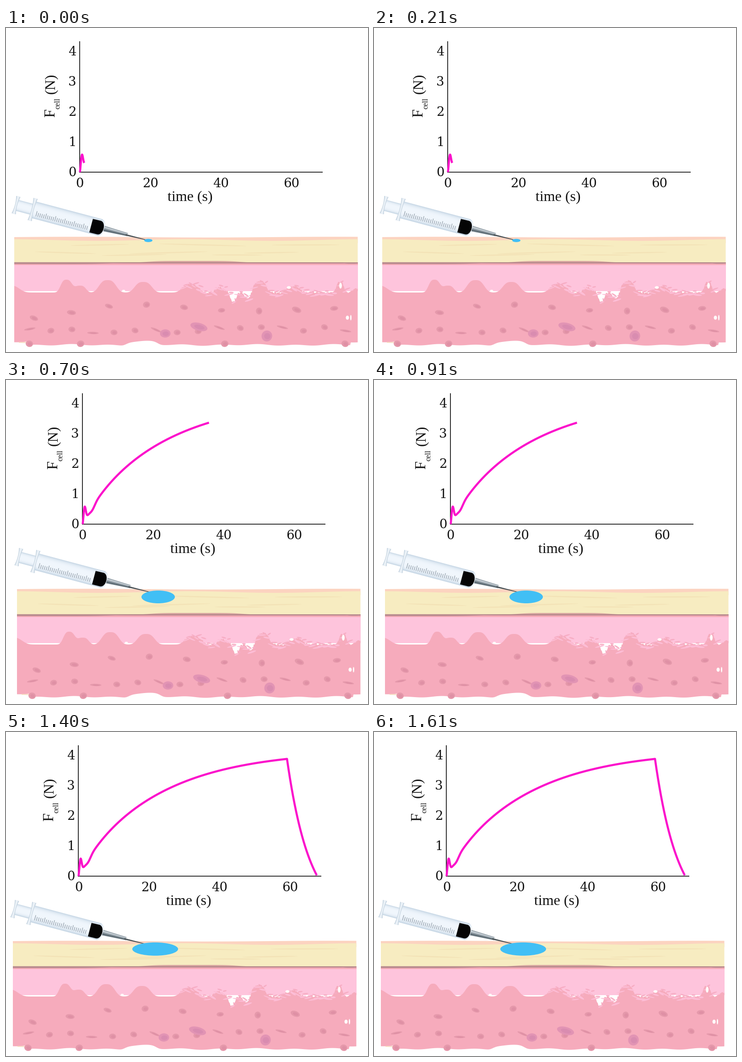
These frames come from a looping animation (791 by 708 pixels, 1750 ms). A matplotlib script:

```python
import math
import numpy as np
import matplotlib.pyplot as plt
from matplotlib.animation import FuncAnimation
from matplotlib.patches import Ellipse, Polygon

W, H, DPI = 791, 708, 100
PX = 72 / DPI  # points per pixel
LEFT, RIGHT = 18, 768.5  # sides of the skin block
X0, Y0 = 161, 315  # origin of the graph

plt.rcParams["toolbar"] = "None"
fig = plt.figure(figsize=(W / DPI, H / DPI), dpi=DPI, facecolor="white")
ax = fig.add_axes([0, 0, 1, 1])
ax.set_xlim(0, W)
ax.set_ylim(H, 0)
ax.axis("off")


def shape(pts, color, z):
    ax.add_patch(Polygon(pts, closed=True, fc=color, lw=0, zorder=z))


def oval(x, y, w, h, color, z, tilt=0):
    return ax.add_patch(Ellipse((x, y), w, h, angle=tilt, fc=color, lw=0, zorder=z))


def line(xs, ys, color, width, z):
    return ax.plot(xs, ys, color=color, lw=width * PX, zorder=z, snap=False,
                   solid_capstyle="butt", solid_joinstyle="round")[0]


def label(x, y, s, size, family="Liberation Serif", **kw):
    kw = {"ha": "center", "va": "baseline", **kw}
    ax.text(x, y, s, fontsize=size * PX, family=family, color="#111111", zorder=9, **kw)


def band(x, top, bottom, color, z):
    """Fill between two edges; each may be an array or a constant."""
    top, bottom = (np.broadcast_to(e, x.shape) for e in (top, bottom))
    shape(np.vstack([np.c_[x, top], np.c_[x, bottom][::-1]]), color, z)


def hump(x, centre, width, power=2):
    return np.exp(-np.abs((x - centre) / width) ** power)


# ---- graph ----
def draw_axes():
    line([X0, X0], [29, Y0 + .8], "black", 1.6, 8)
    line([X0, 692], [Y0, Y0], "black", 1.6, 8)
    for i in range(5):
        label(145, 323.5 - 65.9 * i, str(i), 27.5, "DejaVu Serif")
    for i in range(4):
        label(X0 + .5 + 153.9 * i, 348, str(20 * i), 27.5, "DejaVu Serif")
    label(402.5, 377.5, "time (s)", 32)
    up = {"rotation": 90, "ha": "left", "rotation_mode": "anchor"}
    label(106, 195, "F", 33, **up)
    label(117, 177, "cell", 17, **up)
    label(106, 143.5, "(N)", 32, **up)


def make_trace():
    x = np.arange(0, 455.6, .5)
    rise = (275 * (1 - np.exp(-x / 170)) + 8 * x / 60 * np.exp(1 - x / 60)
            + 30 * hump(x, 4.3, 3.5) * np.tanh(x / 1.5) - 7 * hump(x, 21, 8))
    s = np.linspace(0, 1, 80)
    fall = rise[-1] + (2 - rise[-1]) * (1 - np.exp(-1.3 * s)) / (1 - np.exp(-1.3))
    return X0 + .5 + np.r_[x, x[-1] + 65 * s], Y0 - np.r_[rise, fall]


# ---- skin ----
def draw_skin():
    rng = np.random.default_rng(12)
    x = np.linspace(LEFT, RIGHT, 500)

    # outer layers
    band(x, 457 + .8 * np.sin(x / 90 + 3), 470, "#fcd3c0", 1)
    band(x, 463.3 + 1.8 * np.cos((x - 200) / 61), 514, "#f7ecc1", 2)
    for i in range(8):
        oval(130 + 75 * i, (491, 474, 496)[i % 3], rng.uniform(110, 200), 2.5, "#f3e2b6", 3,
             rng.uniform(-2, 2))
    band(x, 513, 575, "#fec4dc", 3)
    band(x, 513, 517.5, "#f5abb7", 4)
    line([LEFT, RIGHT], [513, 513.2], "#a97d82", 2.4, 5)
    band(x, 512, 513.2 + 2.6 * hump(x, 90, 140, 6) + 2 * hump(x, 755, 16, 4), "#b98b8f", 5)
    band(x, 512.5 - 3.5 * hump(x, 410, 105, 6), 512.5, "#d6a6a0", 4)

    # ragged border of the deep layer
    ridge = 578 + 0 * x
    for cx, height, width in [(5, 16, 28), (132, 28, 15), (162, 15, 15), (222, 27, 22),
                              (300, 23, 22), (403, 18, 22), (468, 10, 14), (497, -20, 8),
                              (528, -12, 9), (555, 25, 16), (628, 13, 18), (730, 23, 10),
                              (768, 9, 14)]:
        ridge -= height * hump(x, cx, width, 3)
    ridge += rng.normal(0, 1.3, x.size) * (x > 380)
    base = (692.5 + 1.2 * np.sin(x / 13) + .8 * np.sin(x / 31)
            - 7.5 * hump(x, 297, 36, 6) - 7.5 * (x < 46) - 6 * (x > 752))
    band(x, ridge, base, "#f6abbc", 6)
    line([28, 48], [687, 687.5], "#f7dcc0", 2, 6)

    # torn flecks and small gaps
    for fx in np.arange(388, 745, 11):
        fy = np.interp(fx, x, ridge)
        oval(fx, fy + rng.uniform(2, 7), rng.uniform(10, 22), rng.uniform(2, 4.5), "#fdbdd6", 7,
             rng.uniform(-35, 35))
        oval(fx + 5, fy - rng.uniform(0, 4), rng.uniform(8, 16), 3, "#f7adc4", 7,
             rng.uniform(-35, 35))
    for gx, gy, w, h in [(731, 563, 6, 13), (618, 567, 9, 6), (257, 574, 7, 4),
                         (746, 633, 7, 9), (753.5, 633, 3, 12)]:
        oval(gx, gy, w, h, "#fffafa", 8)

    # cells in three rows
    def cell(cx, cy, w, h, outer="#e599ab", inner="#df90a5"):
        tilt = rng.uniform(-15, 25)
        oval(cx, cy, w, h, outer, 7, tilt)
        oval(cx + 1, cy + .5, w * .6, h * .55, inner, 7, tilt)

    for i in range(9):
        cell(61 + 82 * i, 614 + 20 * math.cos(i * math.pi / 3) * math.exp(-i / 4),
             rng.uniform(13, 22), rng.uniform(9, 15))
    for i in range(16):
        flat = i % 3 == 0
        cell(52 + 46 * i, 659 + rng.uniform(-8, 8), 25 if flat else 15, 5 if flat else 12)
    for cx in (51, 163, 478, 741):
        cell(cx, 690, 16, 14)
    for cx, cy, w, h in [(348, 667.5, 23, 18), (421.5, 653, 38, 17), (570, 673, 23, 24)]:
        cell(cx, cy, w, h, "#e294b4", "#d98cb0")


# ---- syringe, drawn along its own tilted axis ----
TILT = math.radians(14.9)
COS, SIN = math.cos(TILT), math.sin(TILT)


def along(pts):
    return [(22 + u * COS - v * SIN, 387 + u * SIN + v * COS) for u, v in pts]


def bar(u0, u1, top0, bottom0, top1, bottom1, color, z=11):
    shape(along([(u0, top0), (u1, top1), (u1, bottom1), (u0, bottom0)]), color, z)


def tube(u0, u1, r, nose, z=11):
    """Round bar with a rounded end: strips from a grey-blue rim to a bright middle."""
    rim, mid = np.array([.76, .83, .89]), np.array([.94, .965, .99])
    vs = np.linspace(-r, r, 29)
    for a, b in zip(vs, vs[1:]):
        k = (a + b) / 2 / r
        end = u1 + nose * math.sqrt(1 - k * k)
        bar(u0, end, a - .3, b + .3, a - .3, b + .3, tuple(rim + (mid - rim) * (1 - k**4)), z)


def flange(u, r):
    """Thin plate that widens towards both tips."""
    v = np.linspace(-r, r, 21)
    for grow, color in ((1, "#c3d2df"), (.6, "#eaf1f7")):
        w = grow * (2.6 + 2.2 * (v / r) ** 2)
        shape(along([*zip(u - w, v), *zip((u + w)[::-1], v[::-1])]), color, 12)


def draw_syringe():
    tube(2, 38, 12, 0)
    flange(0, 19.5)
    tube(40, 188, 18.5, 13)
    flange(37.5, 25)
    for i in range(28):
        top = 1 if i % 5 == 0 else 4
        (xa, ya), (xb, yb) = along([(48 + i * 4.25, top), (48 + i * 4.25, 12.5)])
        line([xa, xb], [ya, yb], "#95a1ac", 1.3, 13)
    a = np.linspace(-math.pi / 2, math.pi / 2, 24)
    dome = [(186 + 12 * math.cos(t) ** .8, .8 + 15.5 * math.sin(t)) for t in a[1:-1]]
    shape(along([(170, -14), *dome, (170, 16.5)]), "#050505", 13)

    bar(199, 252, -6, 6.5, -3.8, 3, "#8d99a2", 13)
    bar(199, 252, -4.5, -1, -2.6, -1, "#c3ccd2", 13)
    bar(199, 252, 2, 5, .6, 2.8, "#5c6a72", 13)
    bar(248, 300, -.4, 2.8, -.4, .8, "#4b5357", 13)


draw_axes()
draw_skin()
draw_syringe()
trace_x, trace_y = make_trace()
curve = line([], [], "#fb12cb", 4.6, 10)
drop = oval(0, 0, 1, 1, "#41bff5", 14)

# sideways jog, right end of the trace, drop centre, drop size
POSES = [(0, 171, (311, 464.3), (18, 7)),
         (3, 265.5, (318.5, 470.5), (52, 19.5)),
         (6, 437.5, (326.5, 474), (73, 28)),
         (6, 617, (330.5, 476.3), (100, 29)),
         (-3, 683, (329, 474.3), (100, 29))]


def update(i):
    jog, end, centre, size = POSES[i]
    ax.set_xlim(-jog, W - jog)
    seen = trace_x <= end
    curve.set_data(trace_x[seen], trace_y[seen])
    drop.set_center(centre)
    drop.width, drop.height = size
    return curve, drop


anim = FuncAnimation(fig, update, frames=len(POSES), init_func=lambda: update(0),
                     interval=350, repeat=True, repeat_delay=0, blit=False)
plt.show()
```
